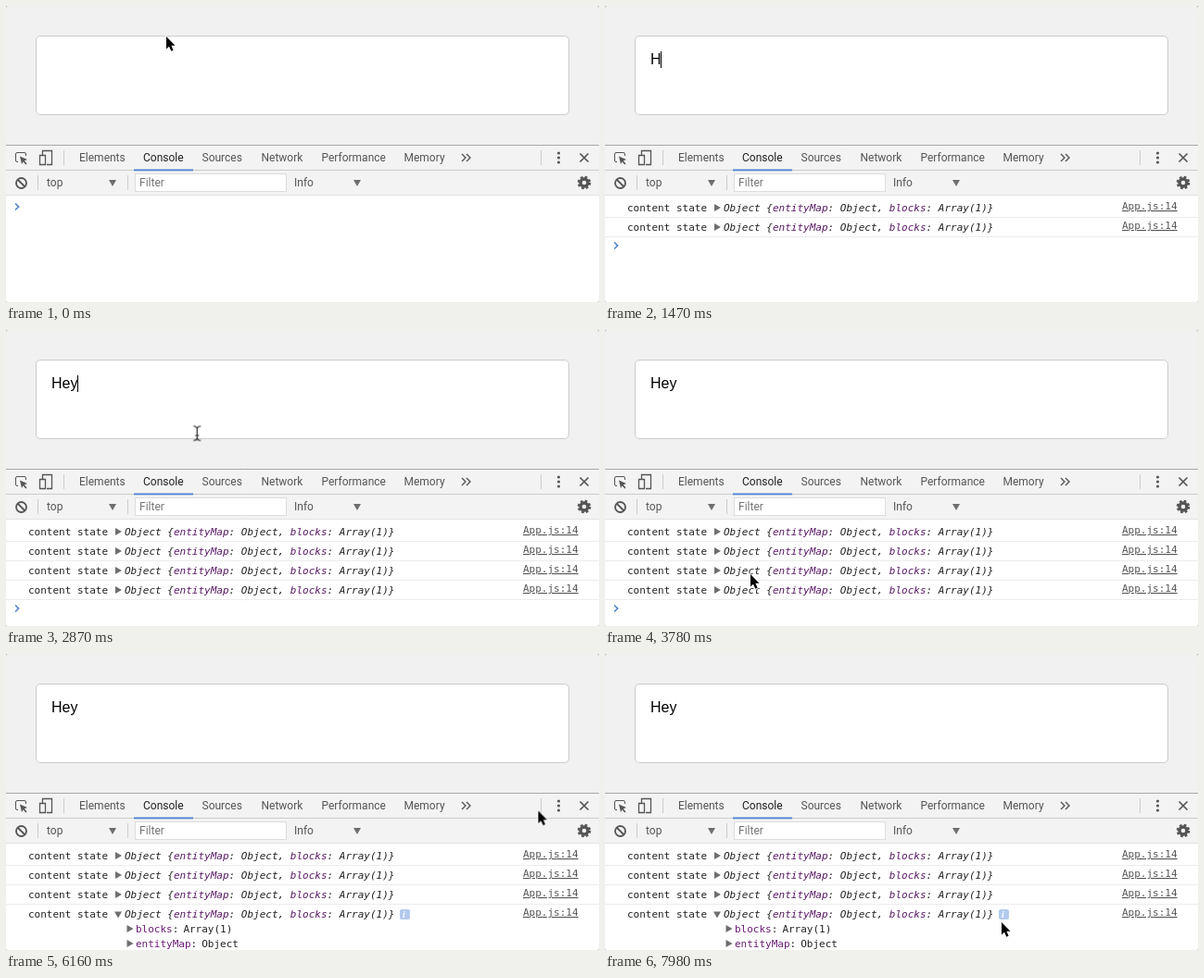
An HTML page that plays this animation: 640 by 320 pixels, repeating every 8000 ms.

```html
<!DOCTYPE html>
<html lang="en">
<head>
<meta charset="utf-8">
<title>Editor console</title>
<style>
  html, body { margin: 0; width: 100%; height: 100%; overflow: hidden; background: #8a8a8a; }
  svg { display: block; width: 640px; height: 320px; border-radius: 2px; }
  text { white-space: pre; }
  .ui { font: 12px Roboto, sans-serif; fill: #555; }
  .mono { font: 11px "DejaVu Sans Mono", monospace; fill: #222; }
  .typed { font: 16px "Liberation Sans", Arial, sans-serif; fill: #000; }
  .preview { font-style: italic; }
  .key { fill: #6a1b75; }
  .preview .key { fill: #5a1a66; }
  .link { fill: #555; text-decoration: underline; }
  .line { fill: none; stroke: #555; }
  .rule { stroke: #ccc; }
  .tri { fill: #6e6e6e; }

  .log1, .log2, .log3, .log4, .closed, .open, .prompt, .prompt-caret, .caret, .blink,
  .arrow, .beam, .resize, .tip { animation: 8s step-end infinite; }

  .log1 { animation-name: log1; }
  .log2 { animation-name: log2; }
  .log3 { animation-name: log3; }
  .log4 { animation-name: log4; }
  @keyframes log1 { 0% { visibility: hidden } 14.8%, 100% { visibility: visible } }
  @keyframes log2 { 0% { visibility: hidden } 18.3%, 100% { visibility: visible } }
  @keyframes log3 { 0% { visibility: hidden } 20.1%, 100% { visibility: visible } }
  @keyframes log4 { 0% { visibility: hidden } 22.7%, 100% { visibility: visible } }

  .closed { animation-name: closed; }
  .open { animation-name: open; }
  @keyframes closed { 0% { visibility: hidden } 22.7% { visibility: visible } 56%, 100% { visibility: hidden } }
  @keyframes open { 0% { visibility: hidden } 56%, 100% { visibility: visible } }

  .prompt { animation-name: prompt; }
  @keyframes prompt {
    0% { transform: translateY(0) }
    14.8% { transform: translateY(21px) }
    18.3% { transform: translateY(42px) }
    20.1% { transform: translateY(63px) }
    22.7% { transform: translateY(84px) }
    56%, 100% { transform: translateY(130px) }
  }
  .prompt-caret { animation-name: prompt-caret; }
  @keyframes prompt-caret { 0% { visibility: hidden } 5.2% { visibility: visible } 11.3%, 100% { visibility: hidden } }

  .caret { animation-name: caret; }
  @keyframes caret {
    0% { transform: translateX(49px) }
    18.3% { transform: translateX(60px) }
    20.1% { transform: translateX(69px) }
    22.7%, 100% { transform: translateX(77px) }
  }
  .blink { animation-name: blink; }
  @keyframes blink {
    0%, 29.7%, 42%, 54.2%, 100% { visibility: hidden }
    14.8%, 35.8%, 48% { visibility: visible }
  }

  .pointer { animation: pointer 8s ease-in-out infinite; }
  @keyframes pointer {
    0%, 1% { transform: translate(173px, 33px) }
    8.5%, 32% { transform: translate(212px, 54px) }
    37% { transform: translate(205px, 118px); animation-timing-function: linear }
    46%, 48.5% { transform: translate(157px, 264px) }
    54.2%, 57.5% { transform: translate(121px, 280px) }
    62.5%, 67% { transform: translate(189px, 280px) }
    79%, 82.5% { transform: translate(597px, 163px) }
    84.7%, 86.2% { transform: translate(578px, 166px) }
    96%, 100% { transform: translate(428px, 290px) }
  }
  .arrow { animation-name: arrow; }
  .beam { animation-name: beam; }
  .resize { animation-name: resize; }
  @keyframes arrow {
    0%, 37%, 88.2%, 100% { visibility: visible }
    2.6%, 83.2% { visibility: hidden }
  }
  @keyframes beam {
    0%, 18.3%, 37%, 100% { visibility: hidden }
    2.6%, 31.5% { visibility: visible }
  }
  @keyframes resize { 0%, 88.2%, 100% { visibility: hidden } 83.2% { visibility: visible } }

  .tip { animation-name: tip; }
  @keyframes tip { 0%, 88.2%, 100% { visibility: hidden } 82.2% { visibility: visible } }
</style>
</head>
<body>
<svg viewBox="0 0 640 320">
  <defs>
    <path id="right" class="tri" d="M0-4 7 0 0 4Z"/>
    <path id="down" class="tri" d="M-4-3.5H4L0 3.5Z"/>
    <g id="entry">
      <text class="mono" x="24" y="222">content state</text>
      <text class="mono preview" x="128" y="222">Object {<tspan class="key">entityMap</tspan>: Object, <tspan class="key">blocks</tspan>: Array(1)}</text>
      <text class="mono link" x="558" y="220">App.js:14</text>
    </g>
    <g id="entry-closed">
      <use href="#entry"/>
      <use href="#right" x="118" y="218"/>
      <path d="M0 228.5H640" stroke="#ececec"/>
    </g>
  </defs>

  <!-- Page with editor -->
  <rect width="640" height="320" fill="#f1f1f1"/>
  <rect x="32.5" y="32.5" width="575" height="85" rx="4.5" fill="#fff" stroke="#ccc"/>
  <text class="typed" x="49" y="63"><tspan class="log2">H</tspan><tspan class="log3">e</tspan><tspan class="log4">y</tspan></text>
  <g class="caret"><rect class="blink" y="49" width="1" height="18"/></g>

  <!-- Tab bar -->
  <rect y="150" width="640" height="55" fill="#f3f3f3"/>
  <path d="M0 150.5H640" stroke="#a8a8a8"/>
  <path d="M0 177.5H640" stroke="#ccc"/>
  <path d="M0 204.5H640" stroke="#e2e2e2"/>
  <rect x="138" y="176.5" width="64" height="1.8" fill="#4a83d4"/>
  <g class="line">
    <path d="M13 168.5H12Q10.5 168.5 10.5 167V160Q10.5 158.5 12 158.5H20Q21.5 158.5 21.5 160V162"/>
    <path d="M15 162.5 23 166 19.8 167.2 22.5 170.5 21.3 171.5 18.5 168.2 17 171Z" fill="#555" stroke="none"/>
    <path d="M39.5 161V156.5H49.5V171.5H44" stroke-width="1.3"/>
    <path d="M36.5 161.5H42.5V171.5H36.5Z" stroke-width="1.3"/>
    <path d="M492 160 496 164 492 168M497 160 501 164 497 168" stroke-width="1.4"/>
    <path d="M619.5 159.5 628.5 168.5M628.5 159.5 619.5 168.5" stroke-width="1.7"/>
  </g>
  <path class="rule" d="M62.5 156V172M577.5 156V172M34.5 183V199M131.5 183V199"/>
  <g fill="#555">
    <circle cx="596.5" cy="159" r="1.6"/>
    <circle cx="596.5" cy="164" r="1.6"/>
    <circle cx="596.5" cy="169" r="1.6"/>
  </g>
  <g class="ui">
    <text x="79" y="168">Elements</text>
    <text x="148" y="168" fill="#222">Console</text>
    <text x="211.5" y="168">Sources</text>
    <text x="275.5" y="168">Network</text>
    <text x="340.5" y="168">Performance</text>
    <text x="429.5" y="168">Memory</text>
  </g>

  <!-- Filter bar -->
  <g class="line" stroke-width="1.8">
    <circle cx="16.5" cy="191.5" r="5.5"/>
    <path d="M12.5 187.5 20.5 195.5"/>
    <circle cx="624" cy="191" r="4" stroke-width="3.4"/>
    <circle cx="624" cy="191" r="6" stroke-width="2.6" stroke-dasharray="2.6 2.112"/>
  </g>
  <rect x="139.5" y="181.5" width="163" height="19" fill="#fff" stroke="#ddd"/>
  <g class="ui">
    <text x="44" y="195">top</text>
    <text x="144" y="195" style="fill:#757575">Filter</text>
    <text x="311" y="195">Info</text>
  </g>
  <use href="#down" x="115" y="191.5"/>
  <use href="#down" x="379" y="191.5"/>

  <!-- Console -->
  <rect y="205" width="640" height="115" fill="#fff"/>
  <use class="log1" href="#entry-closed"/>
  <use class="log2" href="#entry-closed" y="21"/>
  <use class="log3" href="#entry-closed" y="42"/>
  <use class="log4" href="#entry" y="63"/>
  <g class="closed">
    <use href="#right" x="118" y="281"/>
    <path d="M0 291.5H640" stroke="#ececec"/>
  </g>
  <g class="open">
    <use href="#down" x="121" y="282"/>
    <rect x="425" y="276" width="11" height="11" rx="2" fill="#b3cbee"/>
    <text x="428" y="285" font-family="'Liberation Serif', serif" font-size="10" font-weight="bold" font-style="italic" fill="#fff">i</text>
    <use href="#right" x="130.5" y="297"/>
    <use href="#right" x="130.5" y="313"/>
    <g class="mono">
      <text x="140" y="301"><tspan class="key">blocks</tspan>:<tspan dx="5">Array(1)</tspan></text>
      <text x="140" y="317"><tspan class="key">entityMap</tspan>:<tspan dx="5">Object</tspan></text>
    </g>
  </g>
  <g class="prompt">
    <path d="M10 213.5 13.7 217 10 220.5" fill="none" stroke="#4a7fc9" stroke-width="1.5"/>
    <rect class="prompt-caret" x="24" y="210" width="1" height="13"/>
  </g>

  <!-- Tooltip -->
  <g class="tip">
    <rect x="448" y="181" width="190" height="25" fill="#000" opacity=".12"/>
    <rect x="447.5" y="179.5" width="190" height="25" fill="#ededed" stroke="#c6c6c6"/>
    <text class="ui" x="456" y="196" style="fill:#222">Customize and control SitePane</text>
  </g>

  <!-- Mouse pointer -->
  <g class="pointer">
    <path class="arrow" d="M0 0V13.5L3 10.7 5.3 15.8 7.6 14.8 5.4 9.8H9.5Z" stroke="#fff" stroke-width="1.4" paint-order="stroke"/>
    <path class="beam" d="M-3.5-7.5Q.5-7.5.5-4.5V5Q.5 8 -3.5 8M4.5-7.5Q.5-7.5.5-4.5M.5 5Q.5 8 4.5 8M-1.5 2.5H2.5" fill="none" stroke="#222" stroke-width="1.2"/>
    <path class="resize" d="M.5-7 5-2H1.7V0H4.5V2H1.7V4H5L.5 9-4 4H-.7V2H-3.5V0H-.7V-2H-4Z" stroke="#fff" stroke-width="1.4" paint-order="stroke"/>
  </g>
</svg>
</body>
</html>
```
